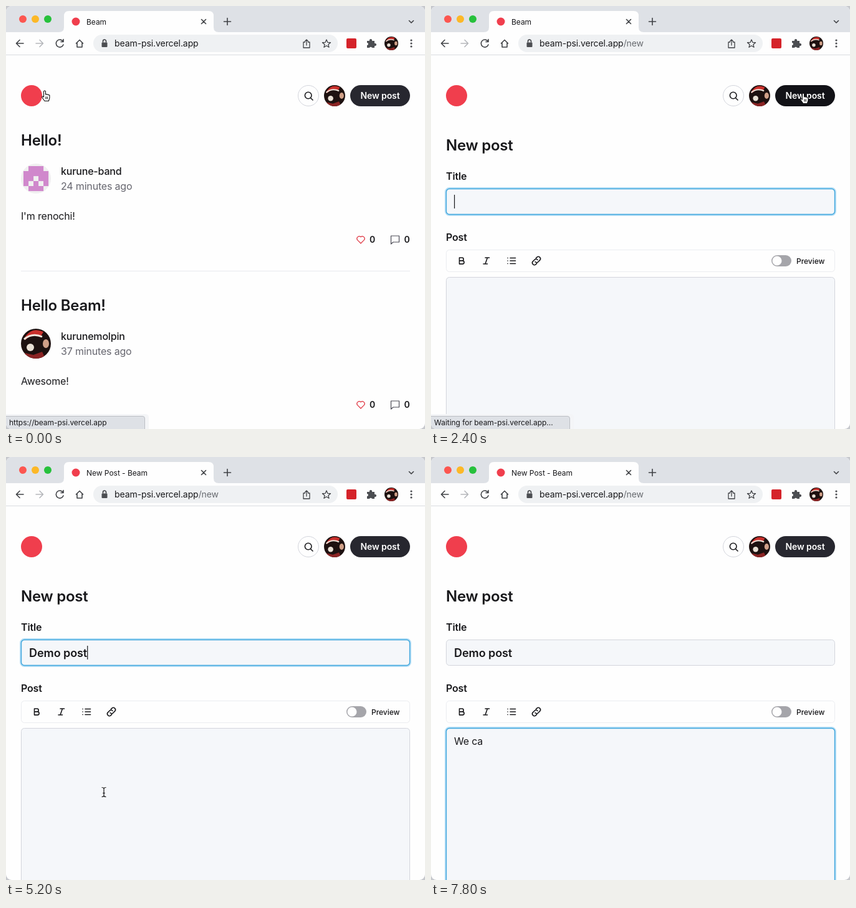
These frames come from a looping animation (672 by 679 pixels, 8 s). An HTML page:

```html
<!DOCTYPE html>
<html lang="en">
<head>
<meta charset="utf-8">
<title>New post demo</title>
<style>
  html, body { margin: 0; width: 100%; height: 100%; overflow: hidden; background: #c6c8cd; }
  svg { display: block; width: 100%; height: 100%; }
  text { font: 16px Inter, "Open Sans", sans-serif; letter-spacing: -.011em; fill: #18181b; white-space: pre; }
  .heading { font-size: 24px; font-weight: 600; letter-spacing: -.011em; }
  .label { font-weight: 600; }
  .title { font-size: 18px; font-weight: 600; letter-spacing: -.004em; }
  .name { font-weight: 500; }
  .muted { fill: #66666f; }
  .count, .button { font-size: 14px; font-weight: 600; letter-spacing: -.006em; }
  .button { fill: #fff; text-anchor: middle; }
  .url { font-size: 14px; letter-spacing: -.006em; }
  .small { font-size: 12px; letter-spacing: -.003em; }
  .line { fill: none; stroke: #3f4145; stroke-width: 1.6; stroke-linecap: round; stroke-linejoin: round; }
  .field { stroke: #d3d5dc; fill: #f5f7fa; }
  .field.focus { stroke: #3fa6dc; stroke-width: 1.4; }
  .ring { fill: none; stroke: #b5def6; stroke-width: 5; }
</style>
</head>
<body>
<svg viewBox="0 0 672 679" preserveAspectRatio="none">
  <defs>
    <clipPath id="window"><rect width="672" height="679" rx="9"/></clipPath>
    <clipPath id="round"><circle cx="24" cy="24" r="24"/></clipPath>
    <g id="photo" clip-path="url(#round)">
      <rect width="48" height="48" fill="#1d1110"/>
      <path d="M5 16Q16-4 36 5L32 12Q18 7 7 18Z" fill="#c9302c"/>
      <path d="M5 17Q18 6 34 13" fill="none" stroke="#efe6dc" stroke-width="3"/>
      <circle cx="15" cy="30" r="6" fill="#e8dfd4"/>
      <ellipse cx="40" cy="24" rx="5" ry="7" fill="#d0a088"/>
      <path d="M6 39L20 42 34 37 39 48H8Z" fill="#8b2424"/>
    </g>
    <g id="pattern" clip-path="url(#round)"></g>
    <path id="heart" d="M0 6L-5.6.4A3.7 3.7 0 0 1 0-4.3 3.7 3.7 0 0 1 5.6.4Z" fill="none" stroke="#df3440" stroke-width="1.2" stroke-linejoin="round"/>
    <path id="bubble" d="M-6.5-6H6.5V4H-3L-6.5 7Z" fill="none" stroke="#4b4b55" stroke-width="1.2" stroke-linejoin="round"/>
  </defs>

  <g clip-path="url(#window)">
    <rect width="672" height="679" fill="#fefefe"/>

    <!-- browser chrome -->
    <rect width="672" height="42" fill="#dee1e6"/>
    <circle cx="27" cy="21" r="6" fill="#fc5650"/>
    <circle cx="47" cy="21" r="6" fill="#fcb827"/>
    <circle cx="67" cy="21" r="6" fill="#27c13c"/>
    <path d="M85 42Q93 42 93 34V16Q93 8 101 8H325Q333 8 333 16V34Q333 42 341 42Z" fill="#fefefe"/>
    <circle cx="112" cy="25" r="6.5" fill="#f03e4d"/>
    <text id="tab" class="small" x="129" y="29.5"></text>
    <path class="line" d="M313.500 21.500l7 7m0-7l-7 7M349.500 25h11m-5.500-5.500v11M646.500 23.500l3.500 3.500 3.500-3.500"/>
    <path class="line" d="M28 60H16.500m5.500-5.500L16.500 60l5.500 5.500M112.500 60l5.500-5.500 5.500 5.500M114 59v7h8v-7M91.500 57a6 6 0 1 0 .5 5M92 53.500v4h-4"/>
    <path class="line" style="stroke:#b5b7bb" d="M48 60h11.500m-5.500-5.500l5.500 5.500-5.500 5.500"/>
    <rect x="140" y="46" width="392" height="28" rx="14" fill="#eff1f3"/>
    <rect x="153.500" y="58.500" width="9" height="7.500" rx="1" fill="#4c4e52"/>
    <path class="line" d="M155.500 58v-1.500a2.500 2.500 0 0 1 5 0V58"/>
    <text class="url" x="174" y="65">beam-psi.vercel.app<tspan id="path" fill="#686b70"></tspan></text>
    <path class="line" style="stroke-width:1.3" d="M479.500 58H477v9h10v-9h-2.500M482 63v-9m-2.500 2.500l2.500-2.500 2.500 2.500M514 54l1.800 4.300 4.700.4-3.600 3 1.100 4.600-4-2.500-4 2.500 1.100-4.600-3.600-3 4.700-.4Z"/>
    <rect x="546" y="52" width="16" height="16" rx="2" fill="#d5232a"/>
    <path d="M579 56h4a2.200 2.200 0 1 1 4 0h4v4a2.200 2.200 0 1 1 0 4v3h-4a2.200 2.200 0 0 0-4 0h-4v-4a2 2 0 0 0 0-4Z" fill="#4c4e52"/>
    <use href="#photo" transform="translate(607 49) scale(.46)"/>
    <g fill="#4c4e52"><circle cx="650" cy="55" r="1.600"/><circle cx="650" cy="60" r="1.600"/><circle cx="650" cy="65" r="1.600"/></g>
    <path d="M0 78.500H672" stroke="#d9dbe0"/>

    <!-- site header -->
    <circle cx="41" cy="144" r="17" fill="#f03e4d"/>
    <circle cx="485" cy="144" r="16.500" fill="none" stroke="#d3d5dc"/>
    <path class="line" d="M488.500 147.500l3.500 3.500M490 143.500a5.300 5.300 0 1 1-10.600 0 5.300 5.300 0 0 1 10.600 0Z" style="stroke:#18181b"/>
    <use href="#photo" transform="translate(510 127) scale(.708)"/>
    <rect id="button" x="552" y="127" width="96" height="34" rx="17"/>
    <text class="button" x="600" y="149">New post</text>

    <g id="feed"></g>

    <g id="editor">
      <text class="heading" x="24" y="231.500">New post</text>
      <text class="label" x="24" y="278.500">Title</text>
      <rect class="ring" id="titleRing" x="24.500" y="293.500" width="623" height="41" rx="5"/>
      <rect class="field" id="titleField" x="24.500" y="293.500" width="623" height="41" rx="5"/>
      <text class="title" id="titleText" x="37" y="320.500"></text>
      <text class="label" x="24" y="376.500">Post</text>
      <rect x="24.500" y="391.500" width="623" height="35" rx="5" fill="none" stroke="#ebecf0"/>
      <g class="line" style="stroke:#18181b">
        <path d="M45.500 404h4.200a2.400 2.400 0 0 1 0 4.900H45.500ZM45.500 408.900h5a2.600 2.600 0 0 1 0 5.200h-5Z"/>
        <path d="M87 404h6.500M84 414h6.500M90.500 404l-3.500 10M127 404.500h8.500M127 409h8.500M127 413.500h8.500M123 404.500h.1M123 409h.1M123 413.500h.1"/>
        <path d="M167 410.500a3.300 3.300 0 0 0 4.800.3l2.700-2.700a3.300 3.300 0 0 0-4.700-4.700l-1.500 1.500M171 407.500a3.300 3.300 0 0 0-4.800-.3l-2.700 2.700a3.300 3.300 0 0 0 4.700 4.700l1.500-1.500"/>
      </g>
      <rect x="546" y="400" width="32" height="18" rx="9" fill="#a5a5aa"/>
      <circle cx="555" cy="409" r="7.500" fill="#fefefe"/>
      <text class="small name" x="586" y="413.500">Preview</text>
      <rect class="ring" id="postRing" x="24.500" y="435.500" width="623" height="300" rx="5"/>
      <rect class="field" id="postField" x="24.500" y="435.500" width="623" height="300" rx="5"/>
      <text id="postText" x="37" y="461.500"></text>
      <rect id="caret" width="1.200" fill="#18181b"/>
    </g>

    <g id="status">
      <path d="M0 655H224Q229 655 229 661V679H0Z" fill="#f4f5f7"/>
      <path d="M-1 658.500H219Q222.500 658.500 222.500 662V680H-1Z" fill="#dee1e6" stroke="#bbbec4"/>
      <text id="statusText" class="small" x="5" y="673"></text>
    </g>

    <g id="pointer" stroke-linejoin="round">
      <path id="hand" d="M-1.500 1q1.500-2 3 0v5l1.500-.5 1.200.8 1.400-.3 1 .9 1.300.2v4.500l-1.500 4.900h-6.500l-4.200-6q0-2 2-1.200l.8.8zM2 9.500v4M4.300 9.500v4" fill="#fff" stroke="#111" stroke-width="1.100"/>
      <path id="arrow" d="M0 0V13L3 10.300 5 15 7.300 14 5.300 9.500H9.300Z" fill="#0a0a0a" stroke="#fff" stroke-width=".8"/>
      <path id="beam" d="M-3.500-7.500Q-.5-7.500 0-6Q.5-7.500 3.500-7.500M-3.500 7.500Q-.5 7.500 0 6Q.5 7.500 3.500 7.500M0-6V6M-1.800 1.500H1.800" fill="none" stroke="#111" stroke-width="1.200"/>
    </g>
  </g>
</svg>
<script>
const el = id => document.getElementById(id);
const show = (id, on) => el(id).setAttribute('visibility', on ? 'inherit' : 'hidden');
const setText = (id, text) => { el(id).textContent = text; };

const LOOP = 8000, STEP = 200;
const SITE = 'beam-psi.vercel.app';
const OPENED = 2400, POST_FOCUS = 5600;

// Time and tip position of the pointer
const POINTER = [
  [0, 62, 136], [1400, 62, 136], [1800, 419, 136], [2200, 597, 140],
  [2600, 597, 140], [3200, 230, 317], [4800, 230, 317], [5200, 157, 538], [LOOP, 157, 538]
];
const TITLE = { text: 'Demo post', keys: [3700, 3800, 3950, 4100, 4200, 4350, 4500, 4650, 4800] };
const POST = { text: 'We ca', keys: [6300, 6500, 6900, 7100, 7200] };

const post = (y, heading, avatar, user, age, body) => `
  <g transform="translate(0 ${y})">
    <text class="heading" x="24" y="223.500">${heading}</text>
    <use href="#${avatar}" x="24" y="253"/>
    <text class="name" x="88" y="270.500">${user}</text>
    <text class="muted" x="88" y="294.500">${age} minutes ago</text>
    <text x="24" y="342.500">${body}</text>
    <use href="#heart" x="569" y="375"/><text class="count" x="583" y="380">0</text>
    <use href="#bubble" x="624" y="375"/><text class="count" x="638.500" y="380">0</text>
    <path d="M24 425.500H648" stroke="#e8e9ee"/>
  </g>`;

el('feed').innerHTML =
  post(0, 'Hello!', 'pattern', 'kurune-band', 24, "I'm renochi!") +
  post(265, 'Hello Beam!', 'photo', 'kurunemolpin', 37, 'Awesome!');

el('pattern').innerHTML = '<rect width="48" height="48" fill="#f0f0f0"/>' +
  ['.###.', '#####', '##.##', '#.#.#', '.###.'].map((row, j) => [...row].map((cell, i) =>
    cell === '#' ? `<rect x="${4 + i * 8}" y="${4 + j * 8}" width="8.100" height="8.100" fill="#d088cc"/>` : ''
  ).join('')).join('');

function pointerAt(t) {
  const i = POINTER.findIndex(key => key[0] > t);
  const [t0, x0, y0] = POINTER[i - 1], [t1, x1, y1] = POINTER[i];
  const k = (t - t0) / (t1 - t0);
  return [x0 + (x1 - x0) * k, y0 + (y1 - y0) * k];
}

function pointerShape(x, y, editing) {
  const inHeader = y > 127 && y < 161;
  if (inHeader && (x > 24 && x < 142 || x > 552 && x < 648)) return 'hand';
  const inField = y > 293 && y < 335 || y > 435;
  return editing && inField ? 'beam' : 'arrow';
}

const typed = ({ text, keys }, t) => text.slice(0, keys.filter(key => key <= t).length);

function drawPointer(t, editing) {
  const [x, y] = pointerAt(t);
  const shape = pointerShape(x, y, editing);
  const hidden = t >= 3800 && t < 5000 || t >= 6200;
  el('pointer').setAttribute('transform', `translate(${x} ${y})`);
  for (const id of ['hand', 'arrow', 'beam']) show(id, !hidden && id === shape);
  el('button').setAttribute('fill', shape === 'hand' && x > 500 ? '#121217' : '#27272f');
}

function drawEditor(t) {
  const inPost = t >= POST_FOCUS;
  setText('titleText', typed(TITLE, t));
  setText('postText', typed(POST, t));
  for (const [name, on] of [['title', !inPost], ['post', inPost]]) {
    show(name + 'Ring', on);
    el(name + 'Field').classList.toggle('focus', on);
  }
  // The caret restarts its blink on focus and on every key
  const marks = [2300, ...TITLE.keys, POST_FOCUS, ...POST.keys].filter(mark => mark <= t);
  const caret = el('caret');
  const text = el(inPost ? 'postText' : 'titleText');
  const width = text.textContent ? text.getComputedTextLength() : 0;
  caret.setAttribute('x', 37 + width);
  caret.setAttribute('y', inPost ? 446 : 303);
  caret.setAttribute('height', inPost ? 20 : 22);
  show('caret', (t - marks.at(-1)) % 1000 < 500);
}

function draw(t) {
  const editing = t >= OPENED;
  show('feed', !editing);
  el('editor').style.display = editing ? '' : 'none';
  setText('tab', t > OPENED ? 'New Post - Beam' : 'Beam');
  setText('path', editing ? '/new' : '');
  show('status', t < 2800);
  setText('statusText', editing ? `Waiting for ${SITE}...` : `https://${SITE}${t >= 2200 ? '/new' : ''}`);
  drawPointer(t, editing);
  if (editing) drawEditor(t);
}

const start = performance.now();
function tick() {
  const elapsed = (performance.now() - start) % LOOP;
  draw(Math.floor(elapsed / STEP) * STEP);
  requestAnimationFrame(tick);
}
tick();
</script>
</body>
</html>
```
